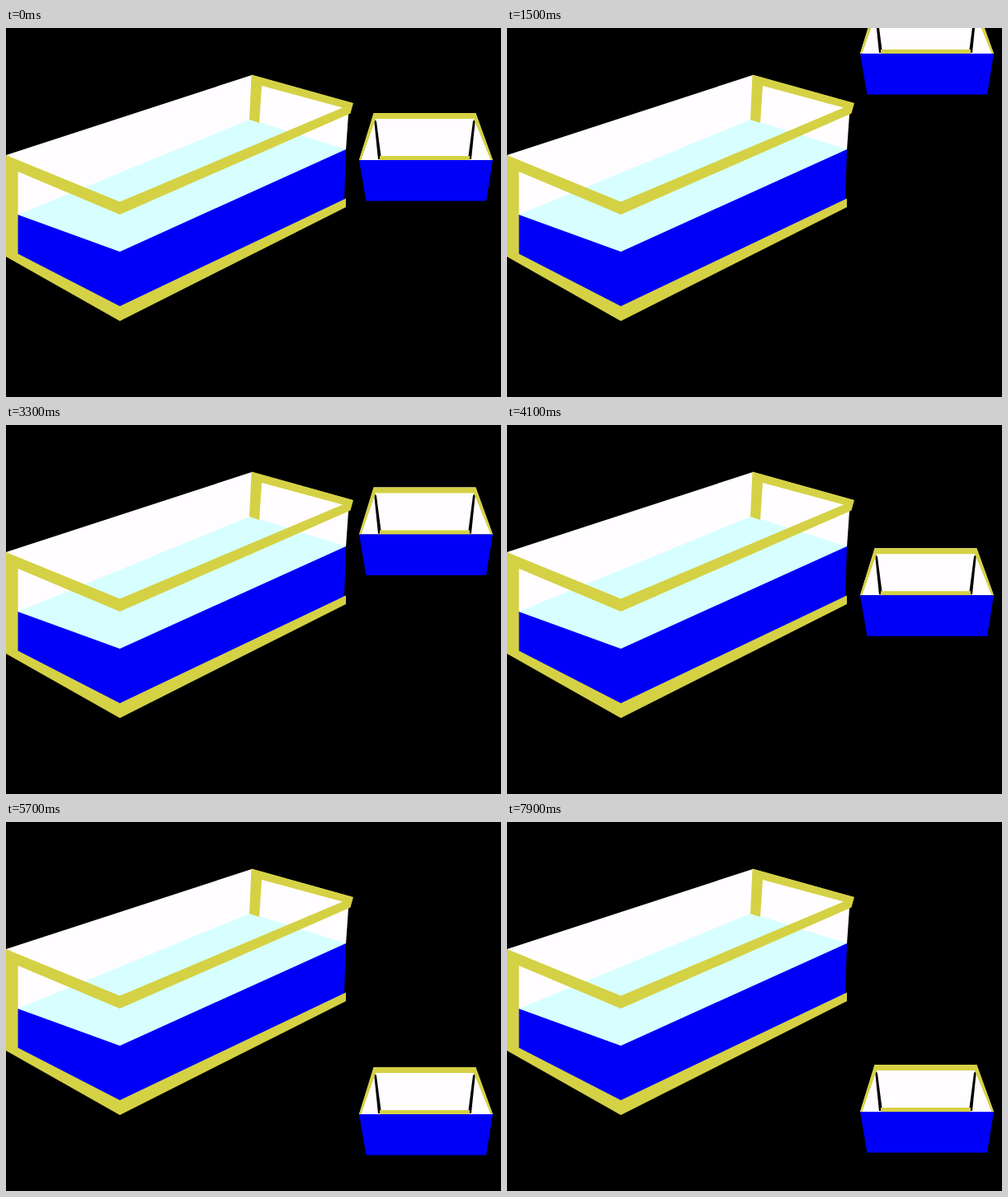
Recreate the animation shown at these times as an HTML page. Size 600x447 px, loop 8000 ms.

```html
<!DOCTYPE html>
<html>
<head>
<meta charset="utf-8">
<title>Water tanks</title>
<style>
  html, body { margin: 0; width: 100%; height: 100%; overflow: hidden; background: #000; }
  svg { display: block; width: 100%; height: 100%; }
  .glass { fill: #fffdff; }
  .surface { fill: #d8ffff; }
  .water { fill: #0000f8; }
  .frame { fill: #d5d145; }
</style>
</head>
<body>
<svg viewBox="0 0 600 447">
  <g id="large">
    <path class="glass" d="M0 154 298 57 420 91 415 105 412 148 138 272 14 228V170Z"/>
    <path class="surface" d="M14.500 226 295 111 307 114 412 147 138 272Z"/>
    <path class="water" d="M14 226 138 271 412 147 410 209 138 338 14 274Z"/>
    <path class="frame" d="M0 154 138 210.500 408 96.500 310 70 307 115 295 111 297.500 56.500
      421 91 417.500 103.500 138 226 14.500 174V273.500L138 337 412 206.500V217L138 355 0 277Z"/>
  </g>
  <!-- Small tank: y = 0 is the front edge of its rim -->
  <g id="small">
    <path class="glass" d="M446-57H569L590 0H428Z"/>
    <path d="M446-50 449-47 455-1H451ZM569-50 566-47 560-1H564Z"/>
    <path class="frame" d="M445.500-57H569.500L590 0H587.500L567-50H448L430.500 0H428ZM453-5H562V0H453Z"/>
    <path class="water" d="M428 0H590L582 49.500H436.500Z"/>
  </g>
</svg>
<script>
const LOOP = 8000, STEP = 100;
// [time in ms, height of the small tank], joined by straight runs
const keys = [[0, 160], [100, 160], [1850, -1.4], [6783, 454.1], [LOOP, 341.7]];
const small = document.getElementById("small");

function heightAt(t) {
  const i = keys.findIndex(([time]) => time > t);
  const [t0, y0] = keys[i - 1], [t1, y1] = keys[i];
  return y0 + (y1 - y0) * (t - t0) / (t1 - t0);
}

const start = performance.now();
function draw() {
  const elapsed = (performance.now() - start) % LOOP;
  const t = Math.floor(elapsed / STEP) * STEP;
  small.setAttribute("transform", `translate(0 ${heightAt(t).toFixed(2)})`);
  requestAnimationFrame(draw);
}
draw();
</script>
</body>
</html>
```
